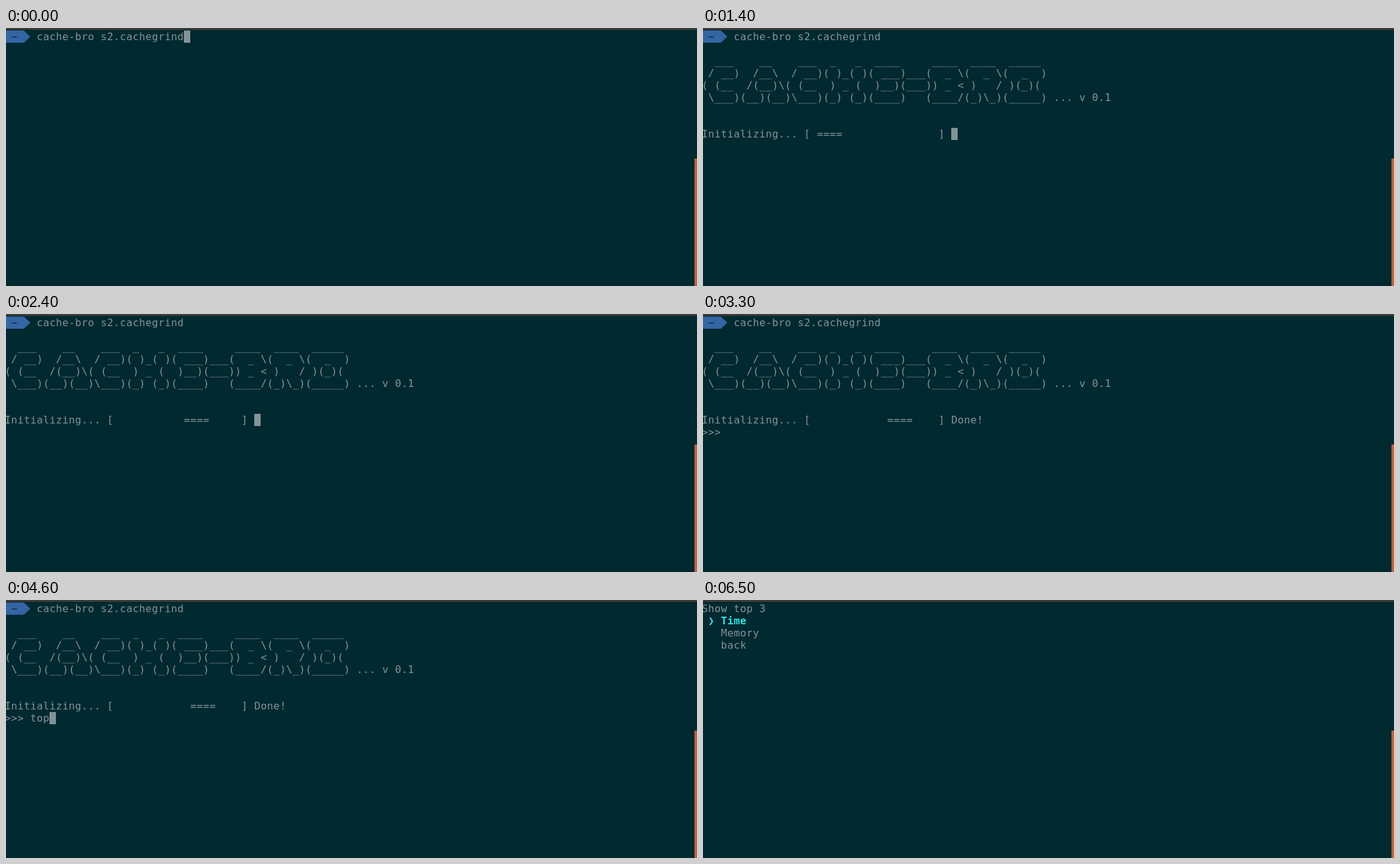
Write an HTML page with a canvas that moves like this. It is 1080 px wide and 403 px high and loops after 8000 ms.

```html
<!DOCTYPE html>
<html lang="en">
<head>
<meta charset="utf-8">
<title>Terminal session</title>
<style>
  html, body { margin: 0; width: 100%; height: 100%; overflow: hidden; background: #002930; }
  canvas { display: block; }
</style>
</head>
<body>
<canvas id="screen" width="1080" height="403"></canvas>
<script>
const ctx = document.getElementById('screen').getContext('2d');
const LOOP = 8000, LEFT = -2, TOP = 4, CELL = 10, LINE = 19, BASELINE = 15;
const BG = '#002930', FG = '#839496', BLUE = '#3465a4', CYAN = '#34e2e2';

const BANNER = String.raw`
  ___    __    ___  _   _  ____     ____  ____  _____
 / __)  /__\  / __)( )_( )( ___)___(  _ \(  _ \(  _  )
( (__  /(__)\( (__  ) _ (  )__)(___)) _ < )   / )(_)(
 \___)(__)(__)\___)(_) (_)(____)   (____/(_)\_)(_____) ... v 0.1`.slice(1).split('\n');

// [start time, text after the prompt]
const TYPED = [[3300, ''], [4300, 't'], [4400, 'to'], [4600, 'top'], [5500, 'top '], [5900, 'top 3']];

// [start time, column, row]; no column means the cursor is hidden
const CURSOR = [
  [0, 28, 0], [400], [1100, 28, 0], [1200, 0, 8], [1400, 39, 8], [1700], [2300, 39, 8], [2900],
  [4000, 4, 9], [4100], [4300, 5, 9], [4400, 6, 9], [4600, 7, 9], [5100], [5500, 8, 9], [5900, 9, 9], [6500]
];

const latest = (list, t) => list.filter(item => item[0] <= t).pop();

function rect(x, y, w, h, color) {
  ctx.fillStyle = color;
  ctx.fillRect(x, y, w, h);
}

// Writes one character per terminal cell
function write(text, col, row, color = FG, weight = 'normal') {
  ctx.font = `${weight} 16px "DejaVu Sans Mono", monospace`;
  ctx.fillStyle = color;
  [...text].forEach((ch, i) => {
    if (ch !== ' ') ctx.fillText(ch, LEFT + (col + i) * CELL, TOP + row * LINE + BASELINE);
  });
}

function drawPrompt() {
  rect(0, TOP, 28, LINE, BLUE);
  ctx.beginPath();
  ctx.moveTo(28, TOP);
  ctx.lineTo(38, TOP + LINE / 2);
  ctx.lineTo(28, TOP + LINE);
  ctx.fill();
  write('~', 1, 0, BG);
  write('cache-bro s2.cachegrind', 5, 0);
}

// The bar moves one cell every 100 ms and bounces at the right end
function drawProgress(t) {
  const step = Math.floor((Math.min(t, 3300) - 1300) / 100);
  const offset = 16 - Math.abs(16 - step);
  write('Initializing... [' + (' '.repeat(offset) + '====').padEnd(20) + ']', 0, 8);
}

function drawMenu() {
  write('Show top 3', 0, 0);
  write('❯ Time', 1, 1, CYAN, 'bold');
  write('Memory', 3, 2);
  write('back', 3, 3);
}

function draw(t) {
  rect(0, 0, 1080, 403, BG);
  rect(0, 0, 1080, 3, '#3c3b37');
  rect(1076, 204, 4, 199, '#bb6240');
  if (t >= 6500) return drawMenu();

  drawPrompt();
  if (t >= 1200) BANNER.forEach((line, i) => write(line, 0, 2 + i));
  if (t >= 1400) drawProgress(t);
  if (t >= 3300) {
    write('Done!', 39, 8);
    write('>>> ' + latest(TYPED, t)[1], 0, 9);
  }
  const [, col, row] = latest(CURSOR, t);
  if (col !== undefined) {
    const x = Math.max(0, LEFT + col * CELL);
    rect(x, TOP + row * LINE, LEFT + (col + 1) * CELL - x, LINE, FG);
  }
}

let start;
function tick(now) {
  start ??= now;
  draw(Math.max(0, now - start) % LOOP);
  requestAnimationFrame(tick);
}
draw(0);
requestAnimationFrame(tick);
</script>
</body>
</html>
```
